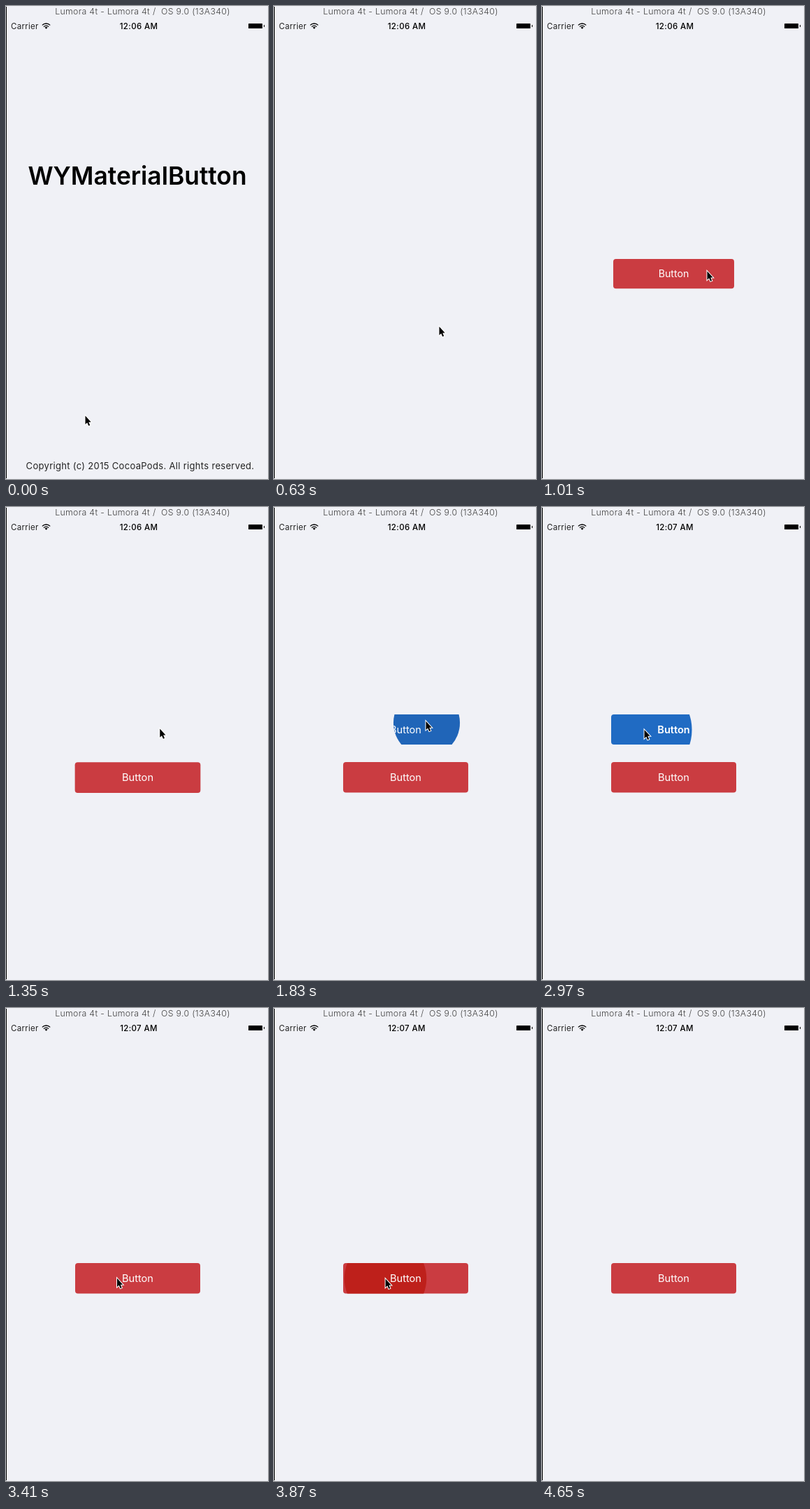
Recreate the animation shown at these times as an HTML page. Size 375 by 675 pixels, loop 4830 ms.

```html
<!DOCTYPE html>
<html lang="en">
<head>
<meta charset="utf-8">
<title>Material button demo</title>
<style>
  html, body { margin: 0; width: 100%; height: 100%; overflow: hidden; background: #f0f1f6; }
  svg { display: block; width: 375px; height: 675px; font-family: Inter, Roboto, sans-serif; }
  .mid { text-anchor: middle; }
  .label { text-anchor: middle; fill: #fff; font-size: 14.6px; }
</style>
</head>
<body>
<svg viewBox="0 0 375 675">
  <defs>
    <clipPath id="blueClip"><circle id="blueRipple"/></clipPath>
    <clipPath id="redClip"><rect x="99" y="364" width="179" height="43.5" rx="4"/></clipPath>
  </defs>
  <rect width="375" height="675" fill="#f0f1f6"/>
  <rect y="1" width="1" height="673" fill="#000"/>

  <text class="mid" x="195.5" y="12" font-size="12.3" font-weight="300" letter-spacing=".33" fill="#444" xml:space="preserve">Lumora 4t - Lumora 4t /  OS 9.0 (13A340)</text>

  <text x="7" y="32.5" font-size="11.5" letter-spacing=".3" fill="#222">Carrier</text>
  <g fill="none" stroke="#000" stroke-width="1.3">
    <path d="M51.8 27.4a8 8 0 0 1 11.4 0M53.9 29.6a5 5 0 0 1 7.2 0"/>
    <path d="M57.5 32.8l-2-2a2.9 2.9 0 0 1 4 0z" fill="#000" stroke="none"/>
  </g>
  <text id="clock" class="mid" x="190" y="32.5" font-size="11.5" font-weight="500" letter-spacing=".35"></text>
  <rect x="347" y="25" width="20" height="7" rx=".6"/>
  <rect x="369" y="27" width="1" height="3"/>

  <g id="launch">
    <text class="mid" x="188" y="254.6" font-size="35.4" font-weight="600">WYMaterialButton</text>
    <text class="mid" x="192" y="661" font-size="13" letter-spacing=".32" fill="#222">Copyright (c) 2015 CocoaPods. All rights reserved.</text>
  </g>

  <g id="blue" clip-path="url(#blueClip)">
    <rect id="blueBox" x="99" y="296" width="179" height="43" rx="4"/>
    <text id="blueLabel" class="label" x="188.5" y="323">Button</text>
  </g>

  <g id="red">
    <rect x="99" y="364" width="179" height="43.5" rx="4" fill="#ca3c41"/>
    <g clip-path="url(#redClip)"><circle id="redRipple" fill="#be201b"/></g>
    <text class="label" x="188.5" y="391">Button</text>
  </g>

  <path id="cursor" d="M.5 .8V13L3.2 10.5L5.2 15L7.2 14.2L5.3 9.7H8.7Z" stroke="#fff" stroke-width="2" paint-order="stroke"/>
</svg>
<script>
const LOOP = 4830;
const $ = id => document.getElementById(id);
const set = (id, attrs) => {
  for (const name in attrs) $(id).setAttribute(name, attrs[name]);
};
const progress = (t, from, to) => Math.max(0, Math.min(1, (t - from) / (to - from)));

const touches = {
  first: { time: 1830, x: 218.5, y: 308, fill: '#2065b8', weight: 400 },
  second: { time: 2670, x: 146, y: 318, fill: '#206bc3', weight: 600 },
  third: { time: 3710, x: 159.5, y: 386 }
};

// Cursor legs: from time, to time, end point; it rests in between
const legs = [
  [45, 60, 135, 592],
  [230, 630, 236, 457],
  [630, 1010, 236, 378],
  [1010, 1410, 217, 305],
  [1980, 2500, 146, 317],
  [2970, 3410, 158.5, 385],
  [3870, 4250, 385, 660]
];

function cursorAt(t) {
  let x = 113, y = 584;
  for (const [from, to, endX, endY] of legs) {
    const u = progress(t, from, to);
    x += (endX - x) * u;
    y += (endY - y) * u;
  }
  return [x, y];
}

function ripple(id, t, touch) {
  set(id, { cx: touch.x, cy: touch.y, r: Math.min(72, 47.5 + .07 * (t - touch.time)) });
}

function fade(t, touch, hold, end) {
  return t < touch.time ? 0 : 1 - progress(t - touch.time, hold, end);
}

function draw(t) {
  const [x, y] = cursorAt(t);
  set('cursor', { transform: `translate(${x} ${y})` });
  set('launch', { opacity: 1 - progress(t, 210, 570) });
  $('clock').textContent = t < 2050 ? '12:06 AM' : '12:07 AM';

  // The red button swings into place, halving its swing every 120 ms
  const beats = Math.max(0, t - 770) / 120;
  const swing = -.134 * .5 ** beats * Math.cos(Math.PI * beats);
  set('red', {
    transform: `translate(188.5 ${386 + 109 * swing}) scale(${1 + swing}) translate(-188.5 -386)`,
    visibility: t < 770 ? 'hidden' : 'visible'
  });

  const { first, second, third } = touches;
  const blue = t < second.time ? first : second;
  ripple('blueRipple', Math.max(t, blue.time), blue);
  set('blue', { opacity: fade(t, blue, 305, 460) });
  set('blueBox', { fill: blue.fill });
  set('blueLabel', { 'font-weight': blue.weight });

  ripple('redRipple', Math.max(t, third.time), third);
  set('redRipple', { opacity: fade(t, third, 250, 640) ** 2 });
}

const start = performance.now();
function tick() {
  draw((performance.now() - start) % LOOP);
  requestAnimationFrame(tick);
}
tick();
</script>
</body>
</html>
```
